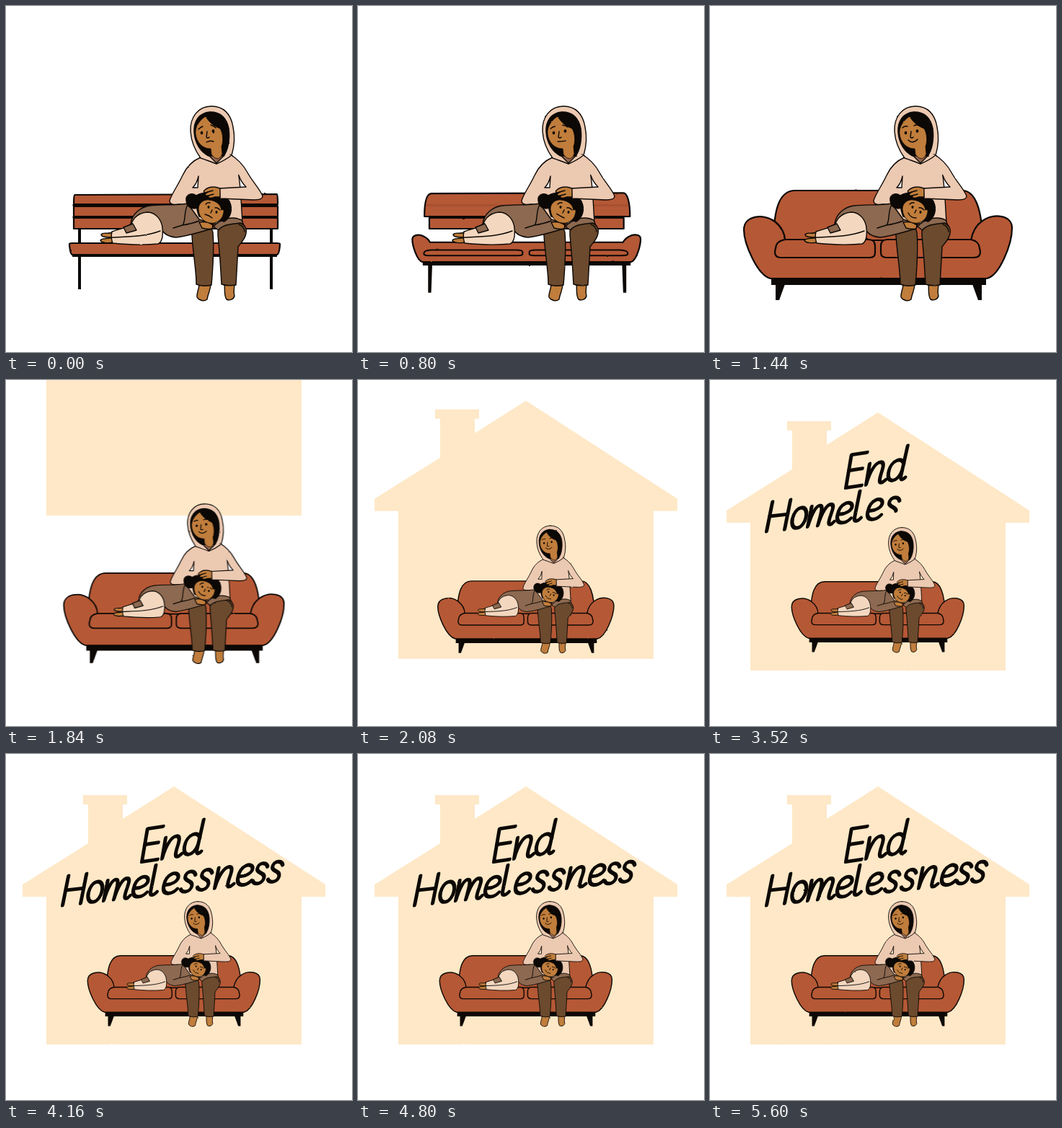
These frames come from a looping animation (480 px wide and 480 px high, 5760 ms). An HTML page:

```html
<!DOCTYPE html>
<html lang="en">
<head>
<meta charset="utf-8">
<title>End Homelessness</title>
<style>
  html, body { margin: 0; width: 100%; height: 100%; overflow: hidden; background: #fff; }
  svg { display: block; width: 100vw; height: 100vh; }
  path, ellipse { stroke-linejoin: round; stroke-linecap: round; }
  .seat { fill: #b55835; stroke: #0c0805; stroke-width: 2.2; }
  .ink { fill: #0c0805; }
  .line { fill: none; stroke: #0c0805; stroke-width: 1.4; }
  .figure { stroke: #0c0805; stroke-width: 1.4; }
  .hoodie { fill: #ecc9b1; }
  .skin { fill: #c07d3c; }
  .pants { fill: #6b4a2e; }
  .dress { fill: #8c6950; }
  .cream { fill: #f3d7bf; }
  .word path { fill: none; stroke: #0c0805; }
</style>
</head>
<body>
<svg viewBox="0 0 480 480" role="img" aria-label="End Homelessness">
  <filter id="rough" filterUnits="userSpaceOnUse" x="0" y="0" width="480" height="480" color-interpolation-filters="sRGB">
    <feTurbulence id="noise" type="fractalNoise" baseFrequency=".14" numOctaves="2" seed="1"/>
    <feDisplacementMap in="SourceGraphic" scale="1.5" xChannelSelector="R" yChannelSelector="G"/>
  </filter>
  <g filter="url(#rough)">
    <path id="house" fill="#fee8c7" d="M23 181 L114 124 V70 H107 V57 H168 V70 H162 V90 L233 45 L443 181 V198 H410 V403 H56 V198 H23Z"/>

    <g id="scene">
      <!-- bench that turns into a sofa -->
      <path class="ink" d="M100 308 L104 308 L104 393 L100 393Z" data-to="M91 386 L104 386 L96 408 L91 408Z"/>
      <path class="ink" d="M366 308 L370 308 L370 393 L366 393Z" data-to="M364 386 L377 386 L377 408 L372 408Z"/>
      <path class="ink" d="M92 344 L376 344 L376 348 L92 348Z" data-to="M85 377 L383 377 L383 387 L85 387Z"/>
      <path class="seat" d="M94 294 H377 V309 H94Z" data-to="M110 294 H350 V309 H110Z"/>
      <path class="seat" d="M94 278 H377 V292 H94Z" data-to="M120 278 H340 V292 H120Z"/>
      <path class="seat" d="M94 275 C94 270 94 262 95 262 L376 261 C377 261 377 270 377 275Z"
            data-to="M88 330 C88 277 98 256 118 256 L350 256 C367 256 378 280 378 330Z"/>
      <path id="gaps" class="line" style="stroke-width:3.4" d="M94 276.5 H376 M94 293 H376"/>
      <path class="seat" d="M92 345 C89 344 88 334 88 330 C88 329 90 329 92 329 C94 329 96 329 98 329 L370 329 C372 329 374 329 376 329 C378 329 380 329 380 330 C380 334 379 344 376 345Z"
            data-to="M84 378 C66 374 47 330 47 310 C47 291 74 287 90 299 C99 306 104 316 104 325 L362 325 C364 314 369 304 378 298 C394 287 419 290 419 308 C419 330 402 374 384 378Z"/>
      <path class="seat" d="M100 345 L220 345 Q228 345 228 345 L228 345 Q228 345 222 345 L98 345 Q92 345 92 345 L92 345 Q92 345 100 345Z"
            data-to="M104 324 L220 324 Q229 324 229 333 L229 342 Q229 349 222 349 L98 349 Q90 349 90 341 L91 336 Q92 326 104 324Z"/>
      <path class="seat" d="M246 345 L364 345 Q374 345 374 345 L374 345 Q374 345 366 345 L245 345 Q238 345 238 345 L238 345 Q238 345 246 345Z"
            data-to="M246 324 L362 324 Q373 326 374 336 L375 341 Q375 349 366 349 L245 349 Q237 349 237 342 L237 333 Q237 324 246 324Z"/>

      <g class="figure">
        <!-- mother -->
        <path class="skin" d="M268 385 C268 394 264 398 265 404 C268 409 275 410 279 407 C280 400 284 393 284 385Z"/>
        <path class="skin" d="M303 385 C304 394 302 402 306 407 C310 409 316 407 317 402 C315 396 317 391 317 385Z"/>
        <path class="hoodie" fill-rule="evenodd" d="M270 210 C258 215 250 224 245 235 C239 248 229 262 227 270 C227 276 234 276 242 275 L262 302 L328 302 C327 285 326 256 323 236 C323 222 319 210 311 206Z M267 236 Q265 246 259 252 L266 252Z"/>
        <path class="dress" d="M288 306 C298 294 316 291 327 297 L331 307 L296 312Z"/>
        <path class="pants" d="M294 312 C300 302 314 303 325 301 C333 304 335 311 332 319 C330 325 324 331 322 334 C321 352 320 370 319 387 Q308 389 299 386 C298 364 296 338 294 318Z"/>
        <path class="pants" d="M258 318 C256 302 284 299 287 314 C289 338 287 364 285 387 Q274 390 264 386 C264 366 259 340 258 318Z"/>
        <path class="line" d="M323 303 Q330 305 331 313"/>
        <path class="hoodie" d="M285 139 C266 139 255 155 256 174 C257 189 262 200 270 211 Q279 214 292 219 Q304 214 313 207 C317 194 318 182 315 168 C312 149 301 139 285 139Z"/>
        <path fill="#936650" d="M281 207 L292 218 L303 207Z"/>
        <path class="ink" d="M283 147 C268 148 260 160 261 175 C262 190 270 203 281 208 L302 208 C308 200 311 185 309 170 C306 155 298 147 283 147Z"/>
        <path class="skin" stroke-width=".8" d="M277 153 C270 157 264 165 263 173 C262 185 270 198 284 198 L285 206 Q289 212 294 212 Q299 210 300 205 L299 195 C302 188 301 176 297 170 C289 167 281 161 277 153Z"/>
        <path class="line" d="M267 171 Q270 168 273 167" data-to="M267 169 Q270 166 274 167"/>
        <path class="line" d="M284 165 Q288 166 291 169" data-to="M283 166 Q287 164 291 166"/>
        <g class="ink" stroke="none">
          <ellipse cx="271.5" cy="176" rx="1.8" ry="2.2"/>
          <ellipse cx="287.5" cy="173.5" rx="1.8" ry="2.2"/>
        </g>
        <path class="line" d="M279 174 L278 182 Q280 184 282 182"/>
        <path class="line" d="M278 189 Q283 186 288 188" data-to="M275 186 Q281 192 288 185"/>

        <!-- child -->
        <path class="skin" d="M148 314 C140 317 135 313 132 317 C132 321 141 321 148 321Z"/>
        <path class="skin" d="M148 321 C140 324 134 321 131 325 C132 329 142 329 148 328Z"/>
        <path class="dress" d="M173 302 C175 288 186 279 200 277 C218 275 235 277 252 274 L268 296 L288 303 L286 309 C270 313 254 319 236 321 C224 320 216 315 214 304Z"/>
        <path class="cream" d="M147 313 C158 309 168 308 174 302 C178 291 186 287 196 286 C208 286 216 297 217 308 C218 318 217 327 211 330 C190 332 168 331 148 329 Q145 321 147 313Z"/>
        <path class="line" d="M147 321 C170 320 194 320 214 312"/>
        <path class="dress" d="M163 307 L176 302 L181 311 L167 315Z"/>
        <path class="line" d="M252 275 C246 288 250 297 245 304 L232 308 M245 304 Q258 302 268 298"/>
        <path class="skin" d="M268 300 Q279 298 287 304 L286 309 Q278 310 272 308Z"/>
        <path class="ink" d="M250 270 C249 262 257 258 264 263 C274 256 302 259 310 271 C315 282 312 293 303 299 L268 292 C266 287 265 283 265 280 C257 283 251 278 250 270Z"/>
        <path class="skin" stroke-width="1" d="M267 279 C269 272 275 268 282 269 C291 270 298 275 299 283 Q303 281 302 287 Q300 298 289 301 C277 303 266 294 267 279Z"/>
        <path class="line" d="M277 275 Q280 272 283 273 M290 280 Q293 279 297 283"/>
        <g class="ink" stroke="none">
          <ellipse cx="281" cy="279" rx="1.5" ry="1.9"/>
          <ellipse cx="292" cy="286" rx="1.5" ry="1.9"/>
        </g>
        <path class="line" d="M286 283 L284 287"/>
        <path class="line" d="M276 289 Q281 290 286 294" data-to="M275 287 Q278 294 286 294"/>

        <!-- mother's arm over the child -->
        <path class="hoodie" d="M311 206 C323 213 330 222 335 231 C342 244 354 256 356 264 C356 268 350 269 344 269 L297 267 L296 253 L333 251 C328 246 325 241 323 235"/>
        <path class="skin" d="M297 253 C289 250 281 251 276 255 C272 258 276 260 280 258 C274 261 276 264 281 263 C279 267 285 267 290 265 L297 265Z"/>
        <path class="line" d="M280 258 L287 256 M281 263 L288 261"/>
      </g>
    </g>

    <g id="top" class="word" transform="matrix(1 -.15 -.17 1 188.500 149.500)"></g>
    <g id="bottom" class="word" transform="matrix(1 -.113 -.2 1 78.500 210)"></g>
  </g>
</svg>
<script>
const LOOP = 5760, TICK = 80, PEN = 5.1;
const byId = id => document.getElementById(id);
const clamp = v => Math.max(0, Math.min(1, v));
const ease = p => (1 - Math.cos(Math.PI * p)) / 2;
const lerp = (a, b, p) => a + (b - a) * p;

// Pen strokes per letter, baseline at y = 0
const glyphs = {
  E: 'M21 -44 H0 V0 H21 M0 -23 H18',
  n: 'M0 -28 V0 C2 -18 8 -28 14 -28 C21 -28 19 -18 18 -12 C17 -4 17 1 22 0 L26 -3',
  d: 'M19 -20 C17 -31 0 -30 0 -12 C0 4 15 3 18 -12 M20 -45 L18 -8 C17 0 20 2 24 -2',
  H: 'M0 -41 V0 M25 -41 V0 M0 -21 H25',
  o: 'M10 -28 C-3 -28 -3 0 9 0 C22 0 22 -28 10 -28',
  m: 'M0 -28 V0 C2 -18 6 -28 11 -28 C17 -28 15 -16 14 0 C16 -18 21 -28 26 -28 C33 -28 30 -18 29 -10 C28 -2 29 1 33 0 L36 -3',
  e: 'M1 -13 C10 -11 20 -16 18 -23 C15 -31 0 -29 0 -12 C0 3 14 2 20 -5',
  l: 'M0 -42 V-6 C0 1 5 1 9 -4',
  s: 'M16 -22 C13 -29 2 -30 2 -21 C2 -14 14 -15 14 -7 C14 2 2 2 -1 -4'
};

function letter(group, text, offsets, scale) {
  const strokes = [];
  let total = 0;
  [...text].forEach((ch, i) => {
    for (const d of glyphs[ch].match(/M[^M]+/g)) {
      const path = document.createElementNS('http://www.w3.org/2000/svg', 'path');
      path.setAttribute('d', d);
      path.setAttribute('transform', `translate(${offsets[i]} 0) scale(${scale})`);
      path.style.strokeWidth = PEN / scale;
      group.append(path);
      const length = path.getTotalLength();
      strokes.push({ path, length, start: total });
      total += length;
    }
  });
  return p => strokes.forEach(({ path, length, start }) => {
    const drawn = Math.min(length, p * total - start);
    path.style.visibility = drawn > 0 ? 'visible' : 'hidden';
    path.style.strokeDasharray = drawn < length ? `${Math.max(0, drawn)} ${length + 20}` : 'none';
  });
}

const writeTop = letter(byId('top'), 'End', [0, 28, 57], 1.04);
const writeBottom = letter(byId('bottom'), 'Homelessness',
  [0, 33, 57, 96, 121, 138, 164, 187, 211, 241, 264, 285], 1);

const numbers = s => s.match(/-?[\d.]+/g).map(Number);
const morphs = [...document.querySelectorAll('[data-to]')].map(path => {
  const shape = path.getAttribute('d');
  return { path, shape, from: numbers(shape), to: numbers(path.dataset.to) };
});

function morph(p) {
  for (const { path, shape, from, to } of morphs) {
    let i = 0;
    path.setAttribute('d', shape.replace(/-?[\d.]+/g, () => {
      const v = lerp(from[i], to[i], p);
      i++;
      return v.toFixed(2);
    }));
  }
  byId('gaps').style.opacity = clamp(1 - p * 3);
}

function draw(t) {
  const ramp = start => clamp((t - start + TICK) / 640);
  const pen = start => clamp((t - start) / 660);
  morph(ease(ramp(640)));
  const zoom = ease(ramp(1600));
  byId('scene').setAttribute('transform',
    `translate(${83 * zoom} ${115.2 * zoom}) scale(${lerp(1, .643, zoom)})`);
  byId('house').setAttribute('transform', `translate(0 ${-430 * (1 - zoom)})`);
  writeTop(t < 2880 ? pen(2160) : 1);
  writeBottom(t < 3840 ? pen(3120) : 1);
  byId('noise').setAttribute('seed', 1 + Math.floor(t / 160) % 4);
}

let last = -1;
function frame(now) {
  const t = Math.floor(now % LOOP / TICK) * TICK;
  if (t !== last) draw(last = t);
  requestAnimationFrame(frame);
}
draw(0);
requestAnimationFrame(frame);
</script>
</body>
</html>
```
